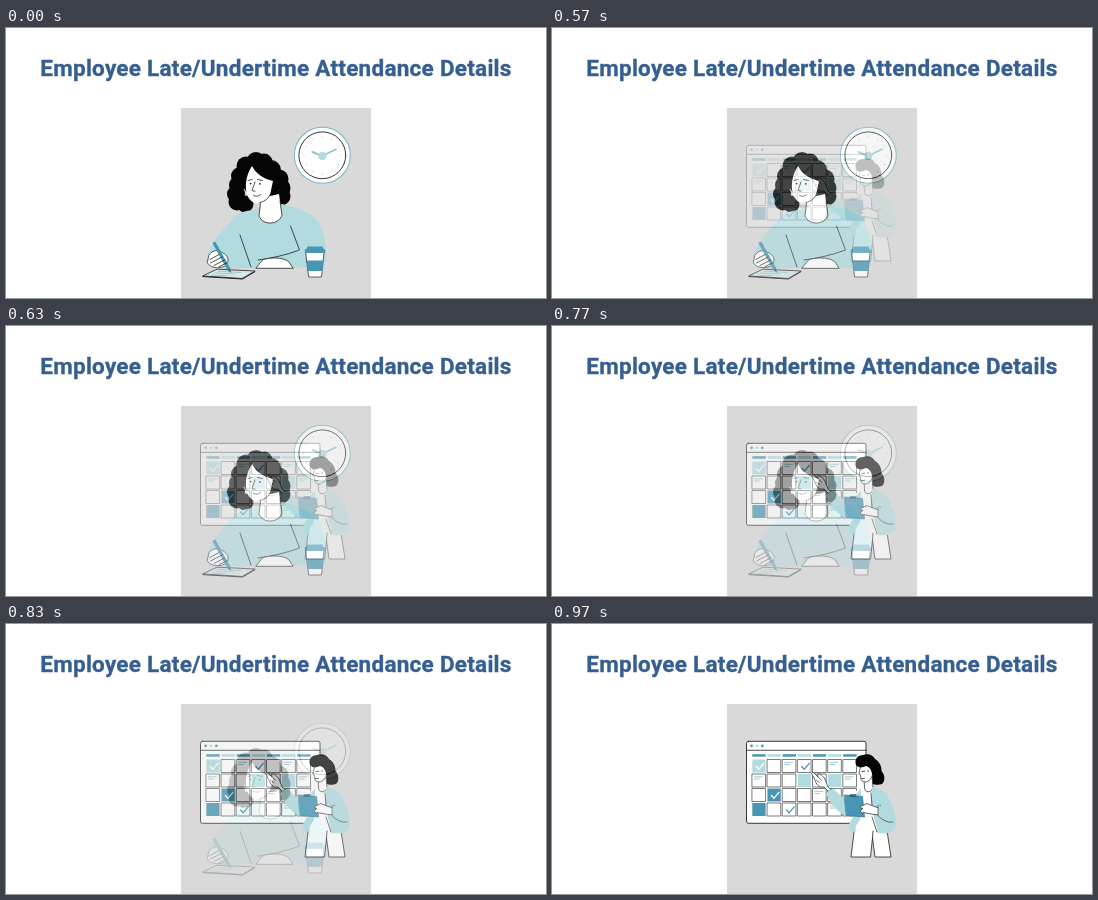
Animation, 540 px wide and 270 px high, one loop 8000 ms. Source, as an HTML page with a canvas:

```html
<!DOCTYPE html>
<html lang="en">
<head>
<meta charset="utf-8">
<title>Attendance Details</title>
<style>
html, body { margin: 0; width: 100%; height: 100%; overflow: hidden; background: #fff; }
canvas, svg { position: absolute; left: 0; top: 0; width: 540px; height: 270px; }
text { font: 700 22.5px Roboto, Inter, sans-serif; letter-spacing: .26px; fill: #365f91; stroke: #365f91; stroke-width: .35px; }
</style>
</head>
<body>
<canvas id="stage"></canvas>
<svg viewBox="0 0 540 270"><text x="270" y="48" text-anchor="middle">Employee Late/Undertime Attendance Details</text></svg>
<script>
const LOOP = 8000;
const FADE = [500, 570, 630, 700, 770, 830, 900, 970];
const GREY = '#d9d9d9', PALE = '#b2dbe0', BLUE = '#4896b3', INK = '#222';
const scale = Math.max(1, window.devicePixelRatio || 1);
let g;

function makeCanvas(canvas) {
  canvas.width = 540 * scale;
  canvas.height = 270 * scale;
  const ctx = canvas.getContext('2d');
  ctx.scale(scale, scale);
  ctx.lineCap = ctx.lineJoin = 'round';
  return ctx;
}

function paint(path, fill, line, width = 0.8) {
  if (fill) { g.fillStyle = fill; g.fill(path); }
  if (line) { g.strokeStyle = line; g.lineWidth = width; g.stroke(path); }
}
const shape = (d, fill, line, width) => paint(new Path2D(d), fill, line, width);
const stroke = (d, color = INK, width = 0.8) => shape(d, null, color, width);

function disc(x, y, r, fill, line, width) {
  const p = new Path2D();
  p.arc(x, y, r, 0, Math.PI * 2);
  paint(p, fill, line, width);
}

function box(x, y, w, h, fill, line, width, r = 0) {
  const p = new Path2D();
  p.roundRect(x, y, w, h, r);
  paint(p, fill, line, width);
}

function clock() {
  disc(316.3, 127.3, 28, '#fff', '#7db9c6', 1.1);
  disc(316.3, 127.3, 23.4, '#fff', '#333', 1);
  for (let i = 0; i < 12; i++) {
    const a = i * Math.PI / 6;
    disc(316.3 + 18.5 * Math.sin(a), 127.3 - 18.5 * Math.cos(a), 0.6, '#a3c9d1');
  }
  stroke('M316 128L306.5 124', '#8fc6d0', 2);
  stroke('M316 128L330 121.3', '#8fc6d0', 1.6);
  disc(316.3, 128, 4.2, PALE);
}

function cup() {
  shape('M300 224L318 224L315.5 249L303 249Z', '#fff', INK, 0.7);
  shape('M300.8 232.5L317.2 232.5L316.2 243L302 243Z', BLUE);
  shape('M301.5 218.5L316.5 218.5L317.5 221L319.2 221.5L319.2 225L298.8 225L298.8 221.5L300.6 221Z', BLUE);
}

function writer() {
  clock();
  const curls = [
    [250, 133.5, 9.5], [240, 138, 9.5], [258, 134, 8.5], [234, 148, 9], [231, 157, 8],
    [230, 166, 9], [231, 174, 8.5], [239, 176, 8.5], [265, 142, 10], [273, 151, 9.5],
    [275, 160, 9.5], [275, 168, 9.5], [267, 172, 9], [254, 152, 18]
  ];
  for (const [x, y, r] of curls) disc(x, y, r, '#050505');

  shape('M252 181C242 183 234 183 229 189C219 200 207 212 202 225L201 237L223 240L318 240C322 226 320 208 313 195C306 184 292 180 276 176Z', PALE);
  shape('M255 170L253 188C257 198 273 197 276 187L273 166Z', '#fff');
  stroke('M254.5 175L253 188C257 198 273 197 276 187L274 173');
  shape('M246 138C241 146 239.5 153 240 161C240.5 168 244 174 250 175C256 175 261 172 264 167L267 153C258 151 250 146 246 138Z', '#fff');
  stroke('M254 174.5C259 173.5 263 170 264.5 166');
  stroke('M242 152.5L246 151.5M251.5 151.5L256.5 152.5');
  disc(244.6, 155.6, 0.9, INK);
  disc(253.8, 155.8, 0.9, INK);
  stroke('M249 154C248 158 246 161 246.2 162.7L249 163.2M247.5 167.3C250 169 253 168.3 254.8 166.4');

  stroke('M234 207L245 239M284.5 198L293.5 222C280 227 267 230 252 232');
  shape('M250 240C253 237 255 232 259 231C269 229 279 230 283 234L287 240Z', '#fff', INK);

  shape('M197 247.8L211 241.2L249 243L236.5 250.3Z', '#d5e7ea', INK, 0.8);
  stroke('M197 248.6L236.5 251L249 243.7', INK, 1);
  stroke('M209 245L228 246M212 243.2L235 244.5M206 247L221 248', '#91b7c0', 0.7);
  shape('M203 227C207 221 213 222 218 225.5C223 229 223.5 234 219 238C213 241 204 240 201.5 235Z', '#fff', INK, 0.7);
  stroke('M208.5 215.5L223 241.5', BLUE, 3.4);
  stroke('M223 241.5L224.5 244', INK, 0.9);
  stroke('M204 231.5L213 226.5M204.5 235L216 229M208 237.5L218.5 232M213 238.7L220.5 235', INK, 0.8);
  cup();
}

function tick(x, y, color) {
  stroke(`M${x + 4} ${y + 7}l2.5 2.8l5 -6`, color, 1.3);
}

function calendar() {
  box(194.5, 117.3, 119.5, 82, '#fff', INK, 0.9, 2);
  stroke('M194.5 126.3H314');
  disc(199.6, 121.8, 1.4, BLUE);
  disc(205, 121.8, 1.4, PALE);
  disc(210.3, 121.8, 1.4, BLUE);
  const fills = { '0,0': PALE, '1,2': BLUE, '0,3': BLUE, '3,1': PALE, '5,1': PALE };
  const ticks = { '0,0': '#fff', '1,2': '#fff', '3,0': BLUE, '2,3': BLUE };
  for (let c = 0; c < 7; c++) {
    const x = 200.3 + c * 15.15;
    box(x, 130.2, 13.4, 2.5, c % 2 ? PALE : BLUE);
    for (let r = 0; r < 4; r++) {
      const y = 135.5 + r * 14.5, key = c + ',' + r;
      box(x, y, 13.3, 13, fills[key] || '#fff', fills[key] ? null : '#444', 0.7);
      if (ticks[key]) tick(x, y, ticks[key]);
      else if (!fills[key] && (c * 2 + r) % 3 === 1) {
        stroke(`M${x + 2} ${y + 2.8}h8M${x + 2} ${y + 5}h5`, '#83bbc7', 0.8);
      }
    }
  }
}

function presenter() {
  // trousers
  shape('M303 200L299 233L318.5 233L320.5 214L323 233L339 233L334 200Z', '#fff', INK, 0.8);
  stroke('M320.5 214L321 207');
  // hair behind the neck
  shape('M313 135C323 132 330 139 329.5 147C333 151 333.5 157 330 160C325 162 318 160 316 156Z', '#050505');
  // shirt, neck and face
  shape('M304 167L319 163L325 206L302 206Z', '#fff');
  shape('M312 153L312.5 164C313 169 319 169 321 164L320 151Z', '#fff', INK, 0.7);
  shape('M309 141C308 145 307.5 147 306.8 150L308.4 150.8C308.3 155 309.4 158 313 158C317 158 320 154 321 149L320 140Z', '#fff', INK, 0.7);
  shape('M304 141C302 135 306 131 311 131C316 129 321 131 323 135C328 138 329 144 327 151L320 151C320 147 318 143 314 142C310 144 306 144 304 141Z', '#050505');
  stroke('M310 147.4h2.6M309.5 154.2c1.2 .7 2.2 .6 3 0M315.5 147h1.2', INK, 0.8);
  // reaching arm
  shape('M276 167L272 163C267 164 264 160 263 156L259.7 149.8C259.7 147.8 262 148.2 263 150L266 153L265.5 150.2C268 149.2 271 152 273 155L276 163L281 167Z', '#fff', INK, 0.7);
  stroke('M266 153.2L269.5 156M264.5 156.5L268 158.5', INK, 0.6);
  shape('M309 165C303 169 302 176 297 179L281 164.5L273.5 169C278 178 285 188 292 191C297 193 300 190 303 186L302 205L308 196Z', PALE);
  stroke('M281 164.5L273.5 169', '#6e9ca5', 0.5);
  // cardigan
  shape('M320 163C330 165 335 169 338 177C342 187 345 195 343.5 203C341 209 335 210 326 209L319 182Z', PALE);
  shape('M304 188L297 200L298 207L303.5 208Z', PALE);
  stroke('M319 169L320 181M320 193L325 208M328 181L330.5 190', INK, 0.7);
  // clipboard and hand
  shape('M292.5 171L310.5 172.5L312.5 193L294.5 191.5Z', BLUE, '#28677f', 0.6);
  box(297.5, 170.2, 7, 2.8, '#28677f', null, 0, 1);
  shape('M329 184C324 184 319 181 315 179.5L309.5 182C307.5 183.5 309 184.5 311 184.2L308.5 186.5C308 188.5 310.5 189 313 188.8C318 190 324 191 330 191Z', '#fff', INK, 0.7);
  shape('M326 181.5L341 184L343.5 199C341 203 333 200 326 191.5Z', PALE);
  stroke('M326 181.5L326 191.5C331 197 337 199 341 198', INK, 0.6);
}

function scene(draw) {
  const canvas = document.createElement('canvas');
  g = makeCanvas(canvas);
  g.fillStyle = GREY;
  g.fillRect(175, 80, 190, 190);
  draw();
  return canvas;
}

const first = scene(writer);
const second = scene(() => { calendar(); presenter(); });
const stage = makeCanvas(document.getElementById('stage'));

function frame() {
  const t = performance.now() % LOOP;
  const mix = FADE.filter(s => t >= s).length / FADE.length;
  stage.clearRect(0, 0, 540, 270);
  stage.globalAlpha = 1;
  stage.drawImage(first, 0, 0, 540, 270);
  stage.globalAlpha = mix;
  stage.drawImage(second, 0, 0, 540, 270);
  requestAnimationFrame(frame);
}
frame();
</script>
</body>
</html>
```
